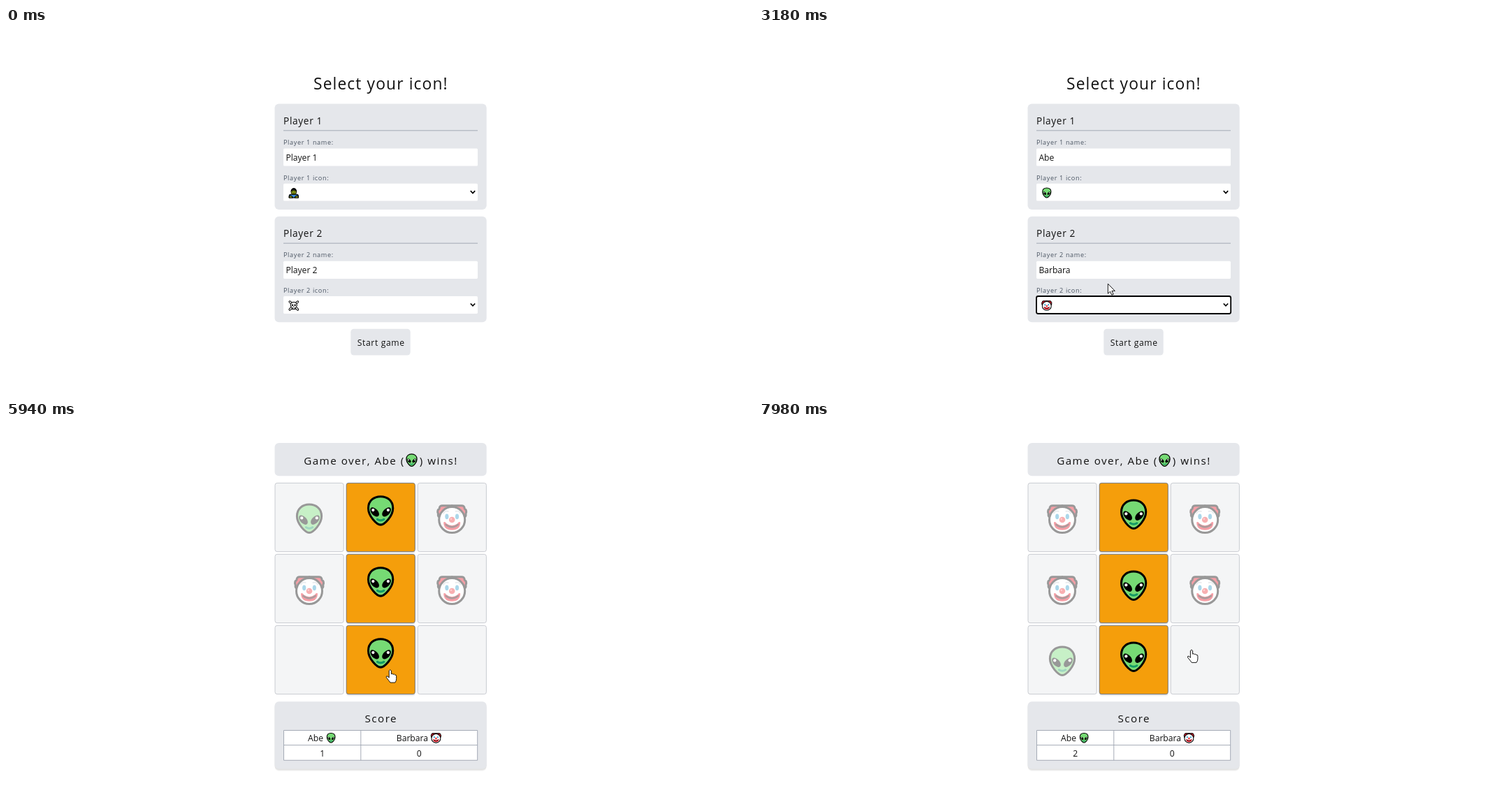
Write an HTML page that moves like this. It is 1069 px wide and 524 px high and loops after 8 s.

```html
<!DOCTYPE html>
<html lang="en">
<head>
<meta charset="utf-8">
<title>Pick an icon</title>
<style>
  html, body { margin: 0; width: 100%; height: 100%; overflow: hidden; background: #fff; }
  svg { display: block; }
  text { font-family: "Open Sans", "Noto Sans", sans-serif; }
</style>
</head>
<body>
<svg width="1069" height="524" viewBox="0 0 1069 524">
  <defs id="icons" stroke="#000" stroke-width="7" stroke-linejoin="round" stroke-linecap="round"></defs>
  <g id="scene"></g>
</svg>
<script>
const LOOP = 8000, STEP = 30, GREY = '#e5e7eb', LINE = '#9ca3af', AMBER = '#f59e0b';
const GAME_AT = 3420, RESET_AT = 6300, FADE = 180;
const scene = document.getElementById('scene');
const pen = document.createElement('canvas').getContext('2d');

// Icons live in a box from -50 to 50.
const p = (d, fill = 'none', extra = '') => `<path d="${d}" fill="${fill}" ${extra}/>`;
const dot = (x, y, rx, ry, fill, extra = '') =>
  `<ellipse cx="${x}" cy="${y}" rx="${rx}" ry="${ry}" fill="${fill}" ${extra}/>`;
const bare = 'stroke="none"';
const eyes = (x, y, r, fill = '#000') => dot(-x, y, r, r, fill, bare) + dot(x, y, r, r, fill, bare);
const mirror = s => s + `<g transform="scale(-1 1)">${s}</g>`;
const bust = (skin, shirt) => p('M-44 46V30Q-44 14-22 14H22Q44 14 44 30V46Z', shirt) + dot(0, -12, 25, 29, skin);

const ICONS = {
  zombie: bust('#a2b81c', '#3c8fd9') + p('M-46 40Q-34 22-16 34L-8 46H-42Z', '#b5c926') +
    p('M46 40Q34 22 16 34L8 46H42Z', '#b5c926') + p('M-24-18Q-18-42 0-42T24-18Q0-34-24-18Z', '#222') +
    eyes(9, -10, 5) + p('M-9 6H9'),
  crossbones: p('M-38-36L38 38M38-36L-38 38', 'none', 'stroke-width="22"') +
    p('M-38-36L38 38M38-36L-38 38', 'none', 'stroke="#fff" stroke-width="9"') +
    dot(0, -4, 30, 28, '#fff') + p('M-15 20V34H15V20', '#fff') + eyes(12, -4, 8) + p('M0 9V13'),
  bat: p('M0 18L-14 8L-30 22L-46-16L-24-20L-10-8L-8-24L0-16L8-24L10-8L24-20L46-16L30 22L14 8Z', '#555'),
  coffin: p('M-22-46L8-40L40 26L26 46L4 44L-40-26Z', '#8a5a3c') + p('M-22-46L-8-36L24 40', 'none', 'stroke-width="4"'),
  pumpkin: p('M-4-28Q-6-44 8-46', 'none', 'stroke="#3a8d2b" stroke-width="12"') + dot(0, 8, 45, 36, '#f7630c') +
    mirror(p('M-28 2L-18-12L-8 2Z', '#000', bare)) + p('M-28 16Q0 42 28 16Q0 24-28 16Z', '#000', bare),
  ghost: p('M-42 40Q-20 34-24 2Q-24-44 8-44Q36-44 34-6Q44-10 46 0Q44 12 32 14Q28 46-8 44Q-28 48-42 40Z', '#fff') +
    `<g transform="translate(6 -10)">${eyes(11, 0, 6)}</g>` + p('M0 12Q8 22 16 10') + p('M-18 8Q-34 4-38-8'),
  ogre: mirror(p('M-22-28Q-42-26-38-46Q-20-46-12-34Z', '#f3c04b')) +
    p('M-38-14Q-30-36 0-36T38-14L34 24Q24 45 0 45T-34 24Z', '#d8352c') +
    mirror(p('M-26-14L-8-5') + dot(-16, 2, 4, 4, '#ff0', bare)) + p('M-20 24Q0 12 20 24L12 34H-12Z', '#fff'),
  clown: mirror(p('M0-43H-30Q-42-44-42-33Q-51-28-46-16Q-48-4-38-5L0-20Z', '#e81224')) + dot(0, 4, 43, 43, '#fff') +
    mirror(p('M-28-18Q-23-28-13-24', 'none', 'stroke="#cfd3d8" stroke-width="5"') + dot(-17, -7, 6, 9, '#2f9ccb', bare)) +
    p('M-28 12Q-28 38 0 38T28 12Q22 8 18 17Q0 29-18 17Q-22 8-28 12Z', '#e81224', bare) +
    p('M-20 20Q0 36 20 20', 'none', 'stroke="#36070b" stroke-width="6"') + dot(0, 4, 10, 10, '#f03a3e', bare) +
    dot(-3, 1, 3, 3, '#ff9494', bare),
  skull: p('M-18 42V27Q-40 20-40-6Q-40-42 0-42T40-6Q40 20 18 27V42Z', '#fff') + eyes(16, -3, 10) +
    p('M0 12V16M-6 34V40M6 34V40', 'none', 'stroke-width="5"'),
  monster: p('M-38-8L-44-34L-26-26L-16-42L0-34L16-42L26-26L44-34L38-8L44 18L30 22L28 44H8V34H-8V44H-28L-30 22L-44 18Z', '#7d64cf') +
    eyes(14, -10, 8) + p('M-18 18Q0 4 18 18Z', '#000'),
  goblin: p('M-40-38H34L28 20Q16 45-8 45T-40 20Z', '#d8352c') + p('M-32-26L-14-15M24-26L10-15') +
    p('M-8-10H40Q50-3 40 9H-8Z', '#ef4444') + eyes(17, -10, 4, '#fff') + p('M-28 26Q-8 14 14 26L8 36H-22Z', '#fff'),
  alien: p('M0 47C-13 47-41 18-41-8C-41-34-22-47 0-47S41-34 41-8C41 18 13 47 0 47Z', '#76da74') +
    mirror(p('M-34-7C-29-19-4-2-5 12C-5 21-14 22-21 17C-29 12-36 3-34-7Z', '#000', bare)) +
    mirror(dot(-25, -2, 5, 5, '#fff', bare)) + p('M-11 29Q0 36 11 29', 'none', 'stroke="#159a66" stroke-width="7"'),
  mage: bust('#f5b942', '#2d7fc4') + p('M-30-20Q-14-48 20-46Q34-30 32-16Z', '#3a96dd') +
    p('M-20 4Q0-4 20 4L4 40Z', '#e8eaed') + eyes(9, -8, 4) + p('M-40-30V44', 'none', 'stroke="#f2a900"'),
  vampire: bust('#e3e4e6', '#3a3a3f') + p('M-26-10V-28Q-20-43 0-43T26-28V-10L14-26L0-18L-14-26Z', '#222') +
    eyes(9, -8, 4) + p('M-7 6H7') + p('M-12 16L0 32L12 16Z', '#d8352c'),
  woman: p('M-40 42Q-46-44 0-44T40 42Z', '#9aa0a6') + dot(0, 4, 30, 36, '#ffb92e') +
    p('M-30-4Q-10-12-2-32Q10-10 30-4Q32-40 0-40T-30-4Z', '#b9bec4') + eyes(12, 4, 5) + p('M-10 22Q0 30 10 22'),
  heart: p('M0 42L-38 4Q-50-14-36-30Q-18-44 0-24Q18-44 36-30Q50-14 38 4Z', '#f7630c')
};
const LIST = Object.keys(ICONS);
document.getElementById('icons').innerHTML = LIST.map(k =>
  `<g id="${k}" stroke="#000" stroke-width="7" stroke-linejoin="round" stroke-linecap="round">${ICONS[k]}</g>`).join('');

const PLAYERS = [{ name: 'Abe', icon: 'alien' }, { name: 'Barbara', icon: 'clown' }];

// Moves: time, cell, and where in the cell the click lands.
const GAMES = [
  { first: 0, moves: [[4050, 0, 23, 14], [4500, 2], [4980, 1, 20, 38], [5250, 3], [5460, 4, 23, 28], [5700, 5], [5880, 7]] },
  { first: 1, moves: [[6480, 3], [6630, 6], [6780, 0], [6930, 1], [7080, 2], [7230, 4], [7380, 5], [7590, 7]] }
];
const isWin = i => i % 3 === 1;
const centre = i => [434 + 102.1 * (i % 3), 138.3 + 102 * Math.floor(i / 3)];

const clicks = GAMES.flatMap(g => g.moves).map(([t, i, dx = 15, dy = 14]) => {
  const [x, y] = centre(i);
  return [t, x + dx, y + dy];
});
const PATH = [
  [90, 880, 484], [390, 448, 188], [450, 448, 187], [600, 320, 190], [900, 360, 205], [1050, 432, 236],
  [1110, 432, 236], [1320, 440, 192], [1500, 441, 143], [1560, 441, 143], [1680, 432, 328], [1770, 424, 344],
  [2580, 428, 346], [2670, 446, 381], [2760, 450, 396], [2820, 450, 396], [3000, 446, 234], [3060, 446, 234],
  [3270, 534, 452], [3450, 534, 452],
  [4080, 457, 152], [4200, 476, 136], [4350, 653, 152], [4740, 556, 176], [5400, 559, 266],
  [6060, 546, 350], [6330, 474, 324], [7830, 619, 326], [8000, 619, 326],
  ...clicks
].sort((a, b) => a[0] - b[0]);

function cursorAt(t) {
  const n = PATH.findIndex(k => k[0] > t);
  if (n < 1) return PATH[n ? PATH.length - 1 : 0].slice(1);
  const [a, b] = [PATH[n - 1], PATH[n]];
  const u = (t - a[0]) / (b[0] - a[0]), e = u * u * (3 - 2 * u);
  return [a[1] + (b[1] - a[1]) * e, a[2] + (b[2] - a[2]) * e];
}

const within = (v, a, b) => v >= a && v < b;
const rect = (x, y, w, h, fill, r = 0, extra = '') =>
  `<rect x="${x}" y="${y}" width="${w}" height="${h}" rx="${r}" fill="${fill}" ${extra}/>`;
const shadow = (x, y, w, h, r) => [1, 2, 3].map(d => rect(x, y + d, w, h, '#000', r, 'opacity=".045"')).join('');
const ring = (x, y, w, h) => rect(x, y, w, h, 'none', 2.5, 'stroke="#000" stroke-width="1.8"');
const icon = (id, x, y, size) => `<use href="#${id}" transform="translate(${x} ${y}) scale(${size / 100})"/>`;
const text = (x, y, s, size, gap = 0, fill = '#111', anchor = 'start') =>
  `<text x="${x}" y="${y}" font-size="${size * .96}" letter-spacing="${gap}" fill="${fill}" text-anchor="${anchor}">${s}</text>`;
function measure(s, size, gap = 0) {
  pen.font = `${size * .96}px "Open Sans", "Noto Sans", sans-serif`;
  return pen.measureText(s).width + s.length * gap;
}
// A centred line with an icon between two pieces of text.
function rich(cx, y, before, id, after, size, gap, room, iconSize) {
  const a = measure(before, size, gap), x = cx - (a + room + measure(after, size, gap)) / 2;
  return text(x, y, before, size, gap) + icon(id, x + a + room / 2 - gap / 2, y - size * .37, iconSize) +
    text(x + a + room, y, after, size, gap);
}

function popup(bottom, selected, [, cy]) {
  const row = 17.36, top = bottom - 16 * row - .9;
  const over = Math.floor((cy - top - .5) / row);
  const lit = cy < bottom && over >= 0 ? over : selected;
  let s = [1, 2, 3].map(d => rect(397.5 - d / 2, top + d, 277 + d, bottom - top, '#000', 1, 'opacity=".09"')).join('');
  s += rect(397.5, top, 277, bottom - top, '#fff', 0, 'stroke="#70757a" stroke-width=".9"');
  s += rect(398, top + .5 + lit * row, 276, row, '#1e90ff');
  return s + LIST.map((k, i) => icon(k, 412.5, top + .5 + (i + .5) * row, 14.5)).join('');
}

function card(n, dy, f) {
  const label = `Player ${n}`;
  let s = rect(384.5, 108.5, 303.2, 151.5, GREY, 6) + text(397, 137.6, label, 14.2, .68) +
    rect(397, 146.4, 278, .9, LINE) + text(397, 166.8, label + ' name:', 9.5, .63, '#4b5563') +
    rect(397, 172.4, 278, 25.2, '#fff', 1.6);
  if (f.marked) s += rect(400.4, 177, measure(f.name, 12.64), 17, '#0078d7');
  s += text(400.4, 189.8, f.name, 12.64, 0, f.marked ? '#fff' : '#111');
  if (f.caret) s += rect(401 + measure(f.name, 12.64), 178, .9, 14.5, '#000');
  if (f.focus) s += ring(397, 172.3, 278.2, 25.2);
  s += text(397, 217.6, label + ' icon:', 9.5, .63, '#4b5563') + rect(397, 222.8, 278, 24.8, '#fff', 1.6) +
    icon(f.icon, 411.8, 236, 15) +
    '<path d="M664.8 233.2l3.2 3.3 3.2-3.3" fill="none" stroke="#000" stroke-width="1.7"/>';
  if (f.ringed) s += ring(397, 222.7, 278.2, 25);
  return `<g transform="translate(0 ${dy})">${s}</g>`;
}

const typed = (t, at, pace, word, old) => t < at ? old : word.slice(0, 1 + Math.floor((t - at) / pace));

function setup(t, pos) {
  const one = {
    name: typed(t, 690, 60, 'Abe', 'Player 1'), marked: within(t, 510, 690), caret: within(t, 690, 1050),
    focus: within(t, 420, 1080), icon: t < 1560 ? 'zombie' : 'alien', ringed: within(t, 1560, 1800)
  };
  const two = {
    name: typed(t, 2070, 60, 'Barbara', 'Player 2'), marked: within(t, 1860, 2070), caret: within(t, 2070, 2520),
    focus: within(t, 1800, 2790), icon: t < 3060 ? 'crossbones' : 'clown', ringed: within(t, 3060, 3300)
  };
  let s = text(440, 87.8, 'Select your icon!', 23.7, 1.15) + card(1, 0, one) + card(2, 161.3, two) +
    rect(493.3, 430.8, 85.4, 37.8, GREY, 4.5) + text(502.8, 455, 'Start game', 12.64, .63);
  if (within(t, 1080, 1560)) s += popup(222.5, 0, pos);
  if (within(t, 2790, 3060)) s += popup(383.8, 1, pos);
  return s;
}

function cellUnder([x, y]) {
  const c = Math.floor((x - 384) / 102.1), r = Math.floor((y - 87) / 102);
  return within(c, 0, 3) && within(r, 0, 3) ? r * 3 + c : -1;
}
function bounce(ms) {
  const u = ms / 500 % 2;
  return -11.4 * (u < 1 ? 1 - u ** 3 : 1 - (2 - u) ** 3);
}

function board(t) {
  const game = GAMES[t < RESET_AT ? 0 : 1], { moves, first } = game;
  const done = moves.filter(m => m[0] <= t), end = moves[moves.length - 1][0];
  const over = t >= end, focus = done.length && !over ? done[done.length - 1][1] : -1;
  const fade = t < RESET_AT ? 0 : Math.max(0, 1 - (t - RESET_AT) / FADE);
  const trail = Array.from({ length: 6 }, (_, k) => cellUnder(cursorAt(Math.max(GAME_AT, t - k * 18))));
  let s = '';
  for (let i = 0; i < 9; i++) {
    const [cx, cy] = centre(i), x = cx - 49, y = cy - 50.9;
    const n = done.findIndex(m => m[1] === i), win = isWin(i);
    const hover = trail.filter(c => c === i).length / trail.length;
    const grey = over || n >= 0 ? 1 : Math.max(hover, win ? 0 : fade);
    const gold = win ? (over ? 1 : fade) : 0;
    let g = over && !win ? '' : shadow(x, y, 98.2, 98.2, 3) + rect(x, y, 98.2, 98.2, '#fff', 3);
    g += rect(x, y, 98.2, 98.2, GREY, 3, `opacity="${grey}"`);
    if (gold) g += rect(x, y, 98.2, 98.2, AMBER, 3, `opacity="${gold}"`);
    g += rect(x, y, 98.2, 98.2, 'none', 3, i === focus ? 'stroke="#000" stroke-width="1.8"' : 'stroke="#6b7280" stroke-width=".9"');
    if (n >= 0) g += icon(PLAYERS[(n + first) % 2].icon, cx, cy + (over && win ? bounce(t - end) : 0), 43);
    s += over && !win ? `<g opacity=".4">${g}</g>` : g;
  }
  return s;
}

function play(t) {
  const game = GAMES[t < RESET_AT ? 0 : 1], all = game.moves.length;
  const told = game.moves.filter(m => m[0] < t).length;
  const who = PLAYERS[(told + game.first) % 2];
  const won = GAMES.filter(g => t >= g.moves[g.moves.length - 1][0]).length;
  const status = told === all ? ['Game over, Abe (', 'alien', ') wins!'] : [`Waiting for ${who.name} (`, who.icon, ')...'];
  let s = rect(384.5, 30, 303.2, 47.2, GREY, 6) + rich(536.5, 60.5, ...status, 15.8, 1.5, 21, 18.5) + board(t);
  s += shadow(384.5, 400.3, 303.2, 96.5, 6) + rect(384.5, 400.3, 303.2, 96.5, GREY, 6);
  s += text(536.8, 430.2, 'Score', 15.8, 1.5, '#111', 'middle');
  s += rect(397.5, 441.5, 277.2, 42.8, '#fff') +
    `<path d="M397.5 441.5h277.2v42.8h-277.2zM397.5 462.6h277.2M507.8 441.5v42.8" fill="none" stroke="${LINE}" stroke-width=".9"/>`;
  s += rich(452.6, 457, 'Abe ', 'alien', '', 12.64, 0, 16, 14.5) + rich(591.2, 457, 'Barbara ', 'clown', '', 12.64, 0, 16.5, 15);
  return s + text(452.6, 478.6, won, 12.64, 0, '#111', 'middle') + text(591.2, 478.6, 0, 12.64, 0, '#111', 'middle');
}

const POINTERS = {
  arrow: 'M0 0V14L3.2 11L5.5 16L7.8 15L5.6 10.2H10Z',
  hand: 'M-1.6 1.4Q0-1.2 1.6 1.4V6.2Q3.2 4.9 4.3 6.7Q6 5.7 7 7.5Q8.9 7 8.9 9.2V13Q8.9 16 7 18.4H.2Q-2 15.4-5.5 11Q-6 8.7-3.8 9.3L-1.6 11.4Z',
  beam: 'M-2.5-7Q0-7 0-5.5V5.5Q0 7-2.5 7M2.5-7Q0-7 0-5.5V5.5Q0 7 2.5 7'
};
function pointer(t, pos) {
  if (t < 90 || within(t, 660, 900) || within(t, 1920, 2580)) return '';
  const [x, y] = pos;
  const open = within(t, 1080, 1560) || within(t, 2790, 3060);
  const inField = t < GAME_AT && !open && within(x, 397, 675) && (within(y, 172, 198) || within(y, 334, 359));
  const hot = t < GAME_AT ? within(x, 493, 579) && within(y, 431, 469) : cellUnder(pos) >= 0;
  const kind = inField ? 'beam' : hot ? 'hand' : 'arrow';
  return `<path d="${POINTERS[kind]}" transform="translate(${x} ${y})" fill="${kind === 'beam' ? 'none' : '#fff'}" stroke="#000" stroke-width=".9" stroke-linejoin="round"/>`;
}

let shown = -1;
function draw(now) {
  const t = Math.floor(now % LOOP / STEP) * STEP;
  if (t !== shown) {
    shown = t;
    const pos = cursorAt(t);
    scene.innerHTML = (t < GAME_AT ? setup(t, pos) : play(t)) + pointer(t, pos);
  }
}
const start = performance.now();
function tick() {
  draw(performance.now() - start);
  requestAnimationFrame(tick);
}
tick();
</script>
</body>
</html>
```
